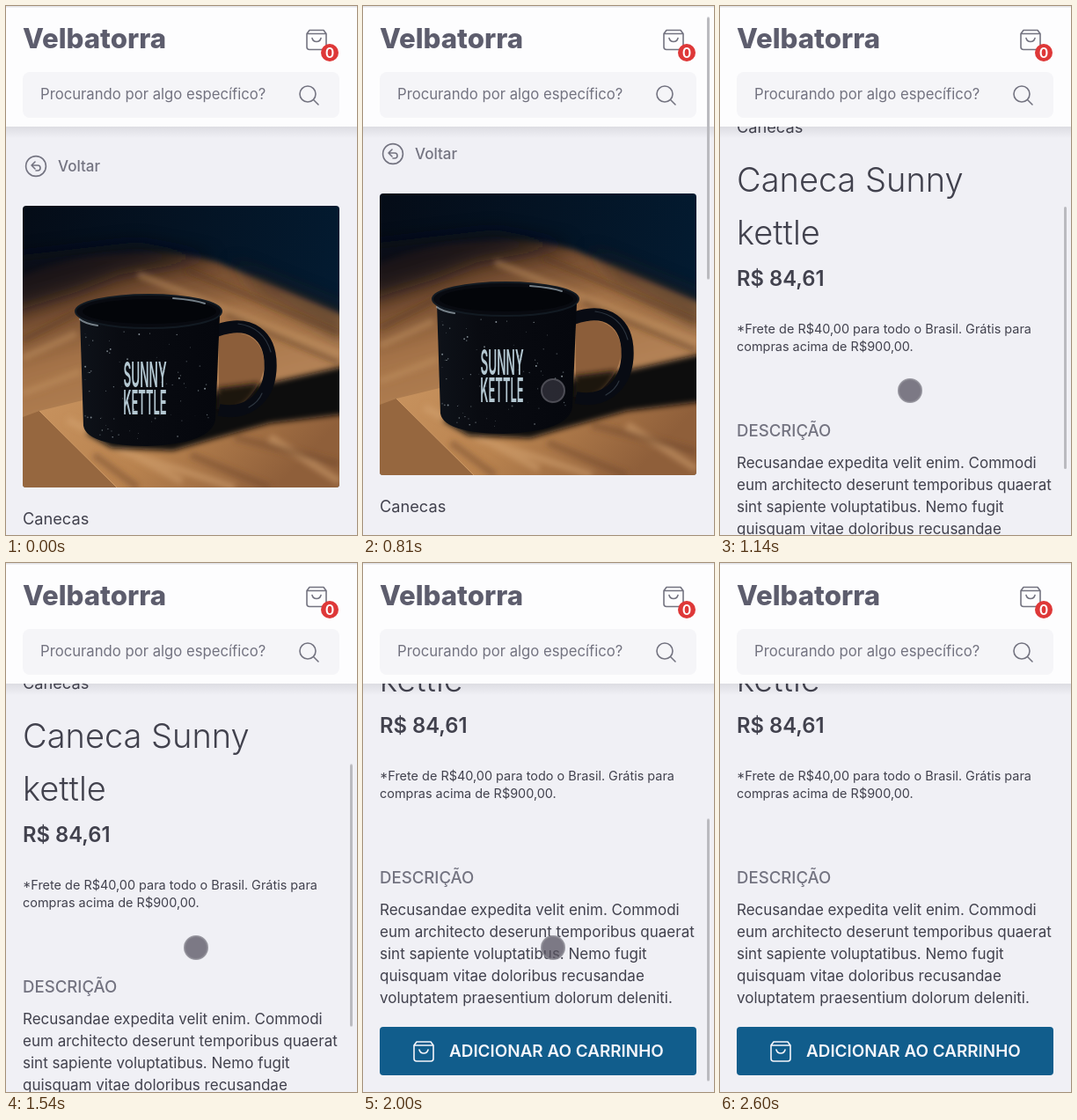
Write an HTML page that moves like this. It is 399 px wide and 601 px high and loops after 2.74 s.

```html
<!DOCTYPE html>
<html lang="pt-BR">
<head>
<meta charset="utf-8">
<title>Loja de canecas</title>
<style>
  @property --scroll { syntax: "<number>"; inherits: true; initial-value: 0; }
  html, body { margin: 0; width: 100%; height: 100%; overflow: hidden; background: #f0f0f5; }
  svg { display: block; font-family: Inter, Roboto, sans-serif; fill: #41414d; }
  .stage { --scroll: 0; animation: scroll 2740ms step-end infinite; }
  .page { transform: translateY(calc(var(--scroll) * -1px)); }
  .thumb { opacity: 0; transform: translateY(calc(5.5px + var(--scroll) * .5px)); animation: thumb 2740ms linear infinite; }
  .cursor { opacity: 0; animation: cursor 2740ms step-end infinite; }
  .line { fill: none; stroke: #737380; stroke-width: 1.6; stroke-linecap: round; stroke-linejoin: round; }
  .soft { fill: #737380; }
  .logo { font-size: 31.2px; font-weight: 800; fill: #5d5d6d; }
  .title { font-size: 38px; font-weight: 300; }
  .price { font-size: 23.8px; font-weight: 600; }
  .note { font-size: 14.45px; }
  .body { font-size: 17px; }
  .print { font-weight: 600; fill: #b4c8d2; text-anchor: middle; }
  .grain { fill: none; filter: url(#blur); }

  @keyframes scroll {
    0% { --scroll: 0; }
    26.6% { --scroll: 3; }
    29.15% { --scroll: 14; }
    31.7% { --scroll: 52; }
    34.25% { --scroll: 125; }
    36.45% { --scroll: 255; }
    39% { --scroll: 390; }
    41.55% { --scroll: 445; }
    56.15% { --scroll: 446; }
    58.35% { --scroll: 450; }
    60.9% { --scroll: 460; }
    63.45% { --scroll: 480; }
    65.65% { --scroll: 507; }
    68.2% { --scroll: 532; }
    70.75% { --scroll: 560; }
    72.95%, 100% { --scroll: 570; }
  }
  @keyframes thumb {
    0%, 26.59% { opacity: 0; }
    26.6%, 86% { opacity: 1; }
    92.6%, 100% { opacity: 0; }
  }
  @keyframes cursor {
    0% { opacity: 0; }
    26.6% { opacity: .6; }
    36.45% { opacity: 1; }
    92.6%, 100% { opacity: 0; }
  }
</style>
</head>
<body>
<svg class="stage" width="399" height="601" viewBox="0 0 399 601">
  <defs>
    <clipPath id="frame"><rect x="19" y="227" width="360" height="320" rx="4"/></clipPath>
    <linearGradient id="wall" x2="1" y2=".3">
      <stop stop-color="#050c17"/><stop offset="1" stop-color="#031b31"/>
    </linearGradient>
    <linearGradient id="wood" gradientUnits="userSpaceOnUse" x1="110" y1="275" x2="170" y2="490">
      <stop stop-color="#2c1d17"/><stop offset=".2" stop-color="#68442b"/><stop offset=".5" stop-color="#a47247"/><stop offset="1" stop-color="#b8875a"/>
    </linearGradient>
    <linearGradient id="board" x2="1" y2=".3">
      <stop stop-color="#c8935f"/><stop offset=".5" stop-color="#b9834f"/><stop offset="1" stop-color="#8f5f3a"/>
    </linearGradient>
    <linearGradient id="enamel" x2="1">
      <stop stop-color="#0e1219"/><stop offset=".3" stop-color="#090b11"/><stop offset="1" stop-color="#05070d"/>
    </linearGradient>
    <linearGradient id="fade" x2="0" y2="1">
      <stop stop-color="#30303c" stop-opacity=".1"/><stop offset="1" stop-color="#30303c" stop-opacity="0"/>
    </linearGradient>
    <filter id="blur" x="-20%" y="-30%" width="140%" height="160%"><feGaussianBlur stdDeviation="3"/></filter>
    <filter id="haze" x="-20%" y="-30%" width="140%" height="160%"><feGaussianBlur stdDeviation="10"/></filter>
    <g id="bag">
      <path d="M4 1H20L23 5V20Q23 23 20 23H4Q1 23 1 20V5ZM1 5H23M7 10Q8 14 12 14T17 10"/>
    </g>
  </defs>

  <rect width="399" height="601" fill="#f0f0f5"/>

  <g class="page">
    <g class="line">
      <circle cx="34" cy="182" r="11.4"/>
      <path d="M33 177L29 181L33 185M29 181H36Q39 181 39 184T36 187H34"/>
    </g>
    <text class="soft body" x="59" y="188" font-weight="500">Voltar</text>

    <g clip-path="url(#frame)">
      <rect x="19" y="227" width="360" height="320" fill="url(#wall)"/>
      <path d="M10 310Q70 284 130 282Q190 276 240 291L390 354V560H10Z" fill="url(#wood)" filter="url(#blur)"/>
      <path d="M0 285L150 268L240 285L130 305L80 325L0 350Z" fill="#0b0d13" opacity=".7" filter="url(#haze)"/>
      <path d="M255 290L390 345V385L290 330Z" fill="#2b1d18" opacity=".5" filter="url(#haze)"/>
      <g class="grain" stroke-width="7">
        <path d="M150 305L379 395M19 400L80 372M19 440L85 415" stroke="#c39465" stroke-opacity=".5"/>
        <path d="M205 300L379 372M250 350L379 405M19 380L82 348" stroke="#4e321f" stroke-opacity=".4"/>
      </g>
      <path d="M38 460L120 440L379 440V547H126Z" fill="url(#board)"/>
      <path d="M19 467L38 460L126 547H19Z" fill="#96673f"/>
      <g class="grain" stroke-width="8">
        <path d="M70 470L200 540M130 505L260 547M300 490L379 540" stroke="#d6a675" stroke-opacity=".5"/>
        <path d="M100 510L150 547M210 510L300 547M260 490L379 520" stroke="#70482c" stroke-opacity=".45"/>
      </g>
      <path d="M38 460L126 547" stroke="#d09b66"/>
      <path d="M200 455L245 438L310 426L390 408V463L300 474L235 492L190 505L120 502L90 485Z" fill="#0d0b0e" filter="url(#blur)"/>
      <path d="M242 372Q292 365 294 408Q290 435 265 455L242 440Z" fill="#8c5e3a"/>
      <path d="M240 434L288 428Q280 450 262 458L240 458Z" fill="#1a1210" filter="url(#blur)"/>
      <path d="M236 370C278 354 303 374 300.500 414C298 448 272 465 242 459" fill="none" stroke="#080b13" stroke-width="14"/>
      <path d="M264 361Q293 365 301 393M276 456Q287 450 291 440" fill="none" stroke="#53616d" stroke-width="1.2" stroke-linecap="round" opacity=".5"/>
      <path d="M84 352L88 477Q92 499 160 500Q234 497 238 470L243 352Z" fill="url(#enamel)"/>
      <g id="specks" fill="#a3afb6"></g>
      <ellipse cx="162" cy="347" rx="83" ry="19" fill="#080a10" stroke="#121a22" stroke-width="2"/>
      <ellipse cx="163" cy="347" rx="76" ry="14" fill="#030509"/>
      <path d="M190 332Q215 334 226 338M84 356Q90 361 104 363" fill="none" stroke="#a1b0b8" stroke-width="2" stroke-linecap="round" opacity=".7"/>
      <text class="print" font-size="13.6" transform="translate(158 433) scale(1 2.9)">SUNNY</text>
      <text class="print" font-size="13" transform="translate(158 464) scale(1 2.9)">KETTLE</text>
    </g>

    <text x="19" y="589" font-size="18.2">Canecas</text>
    <text class="title" x="19" y="656">Caneca Sunny</text>
    <text class="title" x="19" y="716">kettle</text>
    <text class="price" x="19" y="763">R$ 84,61</text>
    <g class="note">
      <text x="19" y="817">*Frete de R$40,00 para todo o Brasil. Grátis para</text>
      <text x="19" y="837">compras acima de R$900,00.</text>
    </g>
    <text class="soft" x="19" y="934" font-size="18.6" font-weight="500">DESCRIÇÃO</text>
    <g class="body">
      <text x="19" y="970">Recusandae expedita velit enim. Commodi</text>
      <text x="19" y="995">eum architecto deserunt temporibus quaerat</text>
      <text x="19" y="1020">sint sapiente voluptatibus. Nemo fugit</text>
      <text x="19" y="1045">quisquam vitae doloribus recusandae</text>
      <text x="19" y="1070">voluptatem praesentium dolorum deleniti.</text>
    </g>
    <rect x="19" y="1097" width="360" height="55" rx="4" fill="#115d8c"/>
    <use href="#bag" class="line" style="stroke: #f5f5fa" x="57" y="1113"/>
    <text x="98" y="1131" font-size="18.9" font-weight="600" fill="#f5f5fa">ADICIONAR AO CARRINHO</text>
  </g>

  <rect y="137" width="399" height="13" fill="url(#fade)"/>
  <rect width="399" height="137" fill="#fdfdfe"/>
  <rect width="399" height="1.5" fill="#e2e2e7"/>
  <text class="logo" x="19" y="48">Velbatorra</text>
  <use href="#bag" class="line" x="341" y="26.5"/>
  <circle cx="368" cy="53" r="10" fill="#de3838"/>
  <text x="368" y="58.5" font-size="16" font-weight="600" text-anchor="middle" style="fill: #fff">0</text>
  <rect x="19" y="75" width="360" height="52" rx="8" fill="#f5f5f8"/>
  <text class="soft" x="39" y="106" font-size="16.7">Procurando por algo específico?</text>
  <path class="line" d="M334 100a9 9 0 1 0 18 0a9 9 0 1 0 -18 0M349.5 106.5L355 112"/>

  <rect class="thumb" x="391" width="3" height="298" rx="1.5" fill="#bababf"/>
  <circle class="cursor" cx="216" cy="437" r="13" fill="#55525f" fill-opacity=".75" stroke="#8b8993" stroke-opacity=".85" stroke-width="2"/>
</svg>
<script>
  // Enamel specks, scattered with a seeded generator.
  let seed = 11;
  const random = () => (seed = seed * 16807 % 2147483647) / 2147483647;
  const specks = document.getElementById("specks");
  for (let i = 0; i < 75; i++) {
    const dot = document.createElementNS(specks.namespaceURI, "circle");
    dot.setAttribute("cx", 90 + 140 * random() ** 1.7);
    dot.setAttribute("cy", 370 + 122 * random());
    dot.setAttribute("r", 0.3 + 0.7 * random());
    dot.setAttribute("opacity", 0.3 + 0.6 * random());
    specks.append(dot);
  }
</script>
</body>
</html>
```
